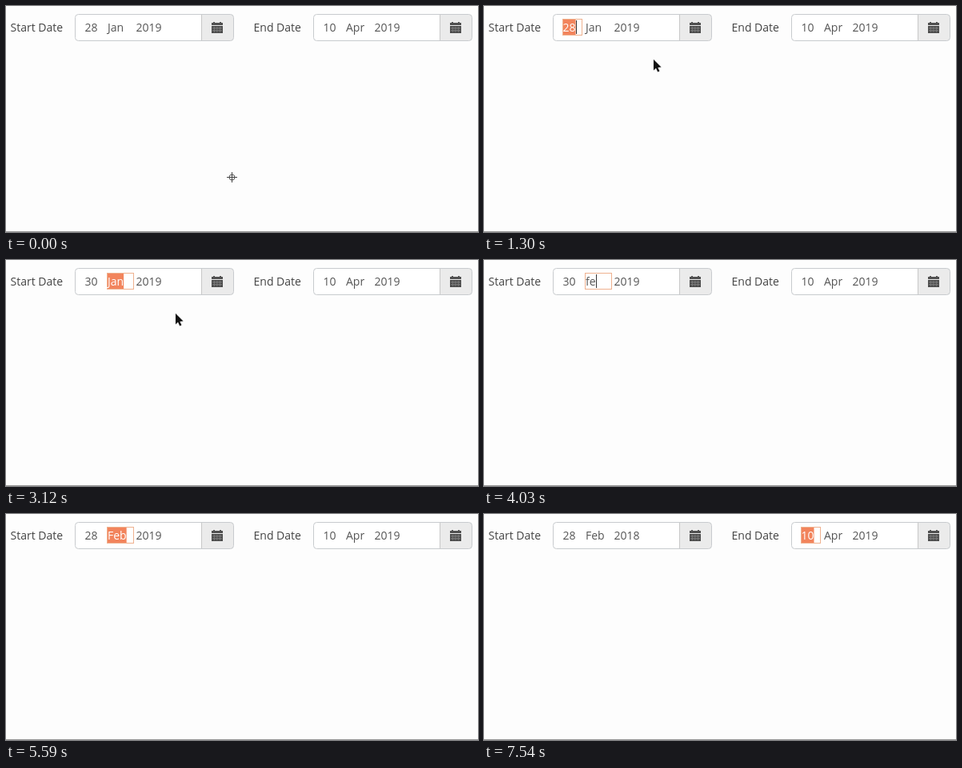
These frames come from a looping animation (590 px wide and 283 px high, 8 s). An HTML page with a canvas:

```html
<!DOCTYPE html>
<html lang="en">
<head>
<meta charset="utf-8">
<title>Date fields</title>
<style>
  html, body { margin: 0; width: 100%; height: 100%; overflow: hidden; background: #fdfdfd; }
  canvas { display: block; }
</style>
</head>
<body>
<canvas id="stage" width="590" height="283"></canvas>
<script>
const ctx = document.getElementById('stage').getContext('2d');
const LOOP = 8000, TICK = 130, GAP = 298, BASE = 31.5;
const FONT = '14px "Open Sans", "Noto Sans", sans-serif';

// Left edge of the text, and box of each date part
const PARTS = {
  day:   { text: 98.5,  x: 98,  w: 25 },
  month: { text: 127,   x: 126, w: 34 },
  year:  { text: 162.5, x: 162, w: 42 }
};

// Each step changes some values; mode is 'select' or 'type'
const STEPS = [
  { at: 0, day: '28', month: 'Jan', year: '2019', part: null, field: 0, mode: 'select' },
  { at: 910, part: 'day', caret: true },
  { at: 1820, day: '29' },
  { at: 2470, day: '30' },
  { at: 3120, part: 'month', caret: false },
  { at: 3380, month: 'f', mode: 'type' },
  { at: 4030, month: 'fe' },
  { at: 4420, day: '28', month: 'Feb', part: 'day', mode: 'select', caret: true },
  { at: 5590, part: 'month', caret: false },
  { at: 5720, part: 'year' },
  { at: 6630, year: '1', mode: 'type' },
  { at: 7150, year: '18' },
  { at: 7540, year: '2018', field: 1, part: 'day', mode: 'select' }
];

const stateAt = t => Object.assign({}, ...STEPS.filter(s => s.at <= t));

function rect(x, y, w, h, color) {
  ctx.fillStyle = color;
  ctx.fillRect(x, y, w, h);
}

function text(str, x, color) {
  ctx.fillStyle = color;
  ctx.fillText(str, x, BASE);
}

function calendar(x, y) {
  rect(x + 2, y, 2, 3, '#555');
  rect(x + 10, y, 2, 3, '#555');
  rect(x, y + 1, 14, 3, '#505050');
  rect(x, y + 5, 14, 9, '#4c4c4c');
  for (let i = 0; i < 2; i++) rect(x + 1, y + 7.5 + i * 3, 12, 0.7, '#999');
  for (let i = 1; i < 4; i++) rect(x + i * 3.5 - 0.4, y + 6, 0.6, 7, '#888');
}

function frame(dx) {
  ctx.save();
  ctx.translate(dx, 0);
  ctx.beginPath();
  ctx.roundRect(86.5, 10.5, 198, 33, 4);
  ctx.fillStyle = '#fff';
  ctx.fill();
  ctx.save();
  ctx.clip();
  rect(244, 10, 42, 34, '#ebebeb');
  ctx.restore();
  ctx.lineWidth = 1;
  ctx.strokeStyle = '#c8cbce';
  ctx.stroke();
  rect(244, 11, 1, 32, '#c8c8c8');
  calendar(257, 20);
  ctx.restore();
}

function part(name, value, dx, s) {
  const p = PARTS[name], x = p.x + dx, left = p.text + dx;
  if (!s) return text(value, left, '#555');
  const width = ctx.measureText(value).width;
  rect(x, 16, p.w, 21, '#fff');
  ctx.strokeStyle = '#efb18f';
  ctx.strokeRect(x + 0.5, 16.5, p.w - 1, 20);
  if (s.mode === 'select') {
    rect(x + 1, 17, left - x - 1 + width, 19, '#f2845c');
    text(value, left, '#fff');
  } else {
    text(value, left, '#555');
  }
  if (s.caret || s.mode === 'type') rect(Math.round(left + width), 18, 1, 17, '#333');
}

function crosshair(x, y) {
  ctx.strokeStyle = '#555';
  ctx.beginPath();
  ctx.arc(x + 0.5, y + 0.5, 3.5, 0, Math.PI * 2);
  ctx.stroke();
  rect(x - 6, y, 13, 1, '#444');
  rect(x, y - 6, 1, 13, '#444');
}

function arrow(x, y) {
  ctx.save();
  ctx.translate(x, y);
  ctx.beginPath();
  [[0, 0], [0, 13.5], [3, 10.8], [5.2, 15.5], [7.4, 14.5], [5.3, 9.9], [9.5, 9.5]]
    .forEach(([a, b]) => ctx.lineTo(a, b));
  ctx.closePath();
  ctx.lineJoin = 'round';
  ctx.lineWidth = 1.5;
  ctx.strokeStyle = '#eee';
  ctx.stroke();
  ctx.fillStyle = '#111';
  ctx.fill();
  ctx.restore();
}

function beam(x, y) {
  rect(x, y - 7, 1, 15, '#333');
  rect(x - 3, y - 8, 7, 1, '#333');
  rect(x - 3, y + 8, 7, 1, '#333');
}

const clamp = v => Math.min(1, Math.max(0, v));
const ease = v => v * v * (3 - 2 * v);
const mix = (a, b, k) => Math.round(a + (b - a) * k);

function pointer(t) {
  if (t >= 3380) return;
  if (t < TICK) return crosshair(282, 214);
  const now = Math.floor(t / TICK) * TICK;
  const go = ease(clamp(now / 650)), back = ease(clamp((now - 910) / 390));
  const x = back ? mix(108, 212, back) : mix(282, 108, go);
  const y = back ? mix(27, 67, back) : mix(214, 27, go);
  (y < 44 && x < 244 ? beam : arrow)(x, y);
}

function draw(t) {
  const s = stateAt(t);
  const end = { day: '10', month: 'Apr', year: '2019' };
  rect(0, 0, 590, 283, '#fdfdfd');
  rect(0, 282, 590, 1, '#989898');
  ctx.font = FONT;
  text('Start Date', 5.5, '#444');
  text('End Date', 309.5, '#444');
  [s, end].forEach((values, i) => {
    frame(i * GAP);
    for (const name in PARTS) {
      const active = s.field === i && s.part === name;
      part(name, values[name], i * GAP, active && s);
    }
  });
  pointer(t);
}

const start = performance.now();
function tick() {
  draw((performance.now() - start) % LOOP);
  requestAnimationFrame(tick);
}
tick();
</script>
</body>
</html>
```
